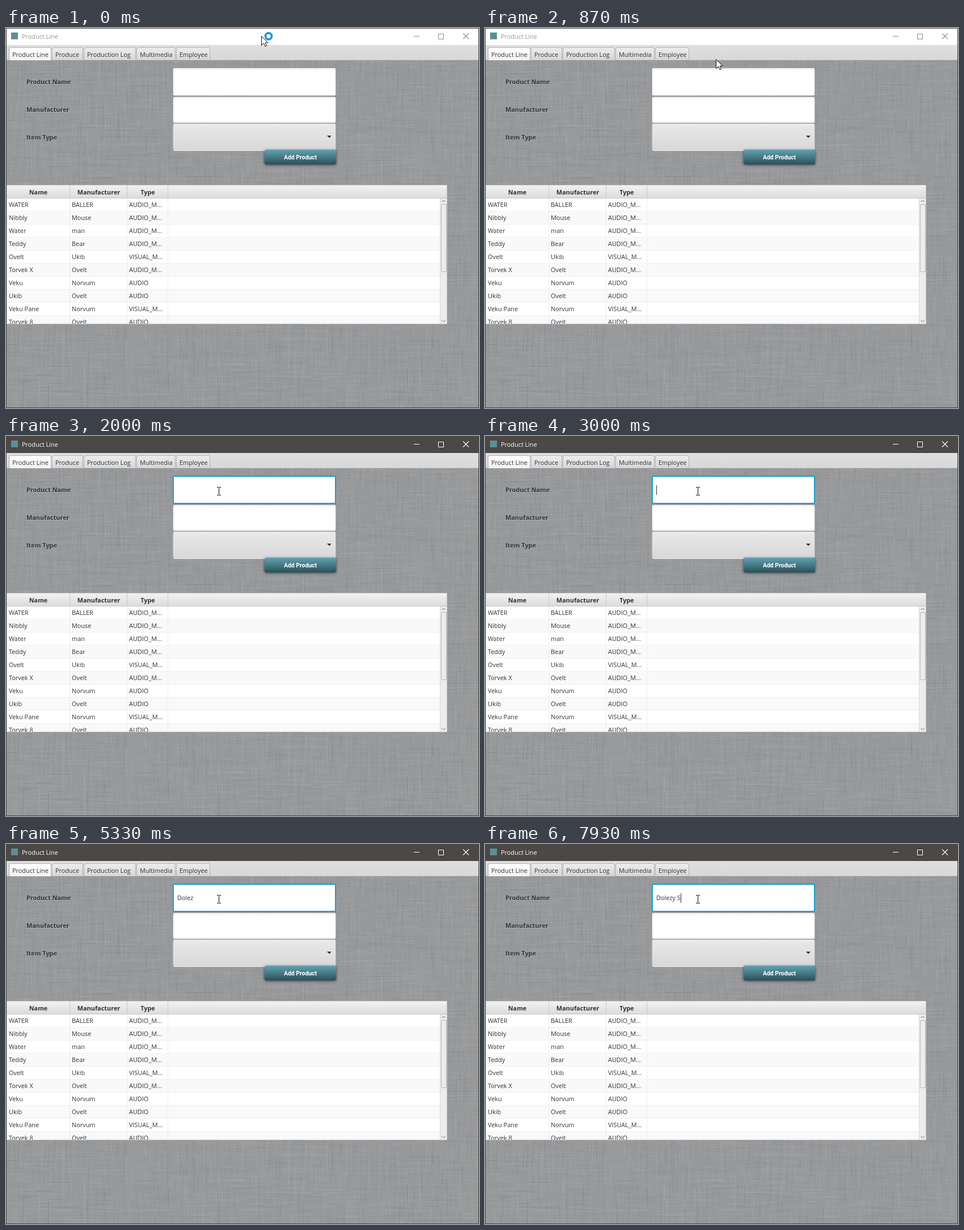
Animation, 834 px wide and 671 px high, one loop 8 s. Source, as an HTML page with a canvas:

```html
<!DOCTYPE html>
<html lang="en">
<head>
<meta charset="utf-8">
<title>Product Line</title>
<style>
  html, body { margin: 0; width: 100%; height: 100%; overflow: hidden; background: #97999b; }
  canvas { display: block; }
</style>
</head>
<body>
<canvas id="stage" width="834" height="671"></canvas>
<script>
const W = 834, H = 671, LOOP = 8000, STEP = 1000 / 15;
const UI = '10.9px "Open Sans", sans-serif';
const UI_BOLD = 'bold 10.9px "Open Sans", sans-serif';
const BUTTON_FONT = 'bold 10.4px Roboto, sans-serif';
const INK = '#333';

const ctx = document.getElementById('stage').getContext('2d');

const TABS = [
  ['Product Line', 6, 80], ['Produce', 82, 136], ['Production Log', 138, 229],
  ['Multimedia', 231, 299], ['Employee', 301, 360]
];
const COLUMNS = [['Name', 1, 112], ['Manufacturer', 113, 213], ['Type', 214, 285]];
const ROWS = [
  ['WATER', 'BALLER', 'AUDIO_M...'],
  ['Nibbly', 'Mouse', 'AUDIO_M...'],
  ['Water', 'man', 'AUDIO_M...'],
  ['Teddy', 'Bear', 'AUDIO_M...'],
  ['Ovelt', 'Ukib', 'VISUAL_M...'],
  ['Torvek X', 'Ovelt', 'AUDIO_M...'],
  ['Veku', 'Norvum', 'AUDIO'],
  ['Ukib', 'Ovelt', 'AUDIO'],
  ['Veku Pane', 'Norvum', 'VISUAL_M...'],
  ['Torvek 8', 'Ovelt', 'AUDIO']
];

// time, typed characters, caret visible
const PRODUCT = 'Dolezy S';
const TYPING = [
  [2000, 0, 0], [2070, 0, 1], [2530, 0, 0], [3000, 0, 1], [3530, 1, 1],
  [3800, 2, 1], [4130, 3, 1], [4330, 4, 1], [4800, 5, 1], [5330, 5, 0],
  [5870, 5, 1], [6330, 5, 0], [6400, 6, 1], [6870, 6, 0], [7070, 7, 1],
  [7600, 7, 0], [7930, 8, 1]
];

// time, x, y of the pointer
const POINTER = [
  [133, 450, 14], [200, 449, 12], [267, 446, 10], [467, 428, 25],
  [1000, 400, 65], [1533, 375, 97]
];

function box(c, x, y, w, h, fill) {
  c.fillStyle = fill;
  c.fillRect(x, y, w, h);
}

function frame(c, x, y, w, h, stroke) {
  c.strokeStyle = stroke;
  c.lineWidth = 1;
  c.strokeRect(x + 0.5, y + 0.5, w - 1, h - 1);
}

function round(c, x, y, w, h, r, fill) {
  c.beginPath();
  c.roundRect(x, y, w, h, r);
  c.fillStyle = fill;
  c.fill();
}

function line(c, points, stroke, width = 1) {
  c.beginPath();
  points.forEach(([x, y]) => c.lineTo(x, y));
  c.strokeStyle = stroke;
  c.lineWidth = width;
  c.stroke();
}

function text(c, str, x, y, font = UI, fill = INK, align = 'left') {
  c.font = font;
  c.fillStyle = fill;
  c.textAlign = align;
  c.fillText(str, x, y);
}

function shade(c, y1, y2, ...colors) {
  const g = c.createLinearGradient(0, y1, 0, y2);
  colors.forEach((color, i) => g.addColorStop(i / (colors.length - 1), color));
  return g;
}

function seeded(seed) {
  return () => {
    seed = (seed + 0x6d2b79f5) | 0;
    let n = Math.imul(seed ^ (seed >>> 15), 1 | seed);
    n ^= n + Math.imul(n ^ (n >>> 7), 61 | n);
    return ((n ^ (n >>> 14)) >>> 0) / 4294967296;
  };
}

// Woven threads: short strokes alternately across and down.
function drawLinen(c) {
  const rand = seeded(4127);
  c.save();
  c.beginPath();
  c.rect(0, 57, W, H - 57);
  c.clip();
  box(c, 0, 57, W, H - 57, '#97999b');
  for (let i = 0; i < 11000; i++) {
    const x = Math.floor(rand() * (W + 80)) - 80;
    const y = Math.floor(rand() * (H + 23)) - 23;
    const length = 8 + rand() * 60;
    const alpha = 0.015 + rand() * 0.05;
    const tone = rand() < 0.5 ? '255,255,255' : '45,48,52';
    box(c, x, y, i % 2 ? length : 1, i % 2 ? 1 : length, `rgba(${tone},${alpha})`);
  }
  c.restore();
}

function drawTabs(c) {
  box(c, 0, 30, W, 27, shade(c, 30, 57, '#dfdfdf', '#d8d8d8'));
  box(c, 0, 56, W, 1, '#c4c4c4');
  TABS.forEach(([label, left, right], i) => {
    const bottom = i ? 56 : 57;
    round(c, left - 1, 34, right - left + 1, bottom - 34, [4, 4, 0, 0], '#b3b3b3');
    round(c, left, 35, right - left - 1, bottom - 35, [3, 3, 0, 0],
      i ? shade(c, 35, 57, '#ececec', '#d7d7d7') : shade(c, 35, 57, '#ffffff', '#f1f1f1'));
    text(c, label, left + 5, 51);
  });
}

function drawField(c, y, h) {
  round(c, 294.5, y + 0.5, 287, h - 1, 3, '#c4c4c4');
  round(c, 295, y + 1, 286, h - 2, 2, shade(c, y, y + 6, '#eeeeee', '#ffffff'));
}

function drawForm(c) {
  [['Product Name', 99], ['Manufacturer', 148], ['Item Type', 197]].forEach(([label, y]) => {
    text(c, label, 36, y + 1, UI_BOLD, 'rgba(255,255,255,.4)');
    text(c, label, 36, y, UI_BOLD);
  });
  drawField(c, 70, 50);
  drawField(c, 121, 47);

  round(c, 294.5, 168.5, 287, 48, 3, '#c4c4c4');
  round(c, 295, 169, 286, 47, 2, shade(c, 169, 216, '#e9e9e9', '#d8d8d8'));
  box(c, 296, 216, 284, 1, '#eeeeee');
  c.beginPath();
  c.moveTo(566, 190);
  c.lineTo(574, 190);
  c.lineTo(570, 194);
  c.fillStyle = INK;
  c.fill();

  c.save();
  c.shadowColor = 'rgba(0,0,0,.6)';
  c.shadowBlur = 5;
  c.shadowOffsetY = 1;
  round(c, 456, 215, 126, 26, 3, shade(c, 215, 241, '#61a2b1', '#2a5058'));
  c.restore();
  text(c, 'Add Product', 519, 232, BUTTON_FONT, '#fff', 'center');
}

function drawScrollBar(c) {
  box(c, 765, 301, 12, 221, '#ececec');
  box(c, 765, 301, 1, 221, '#d8d8d8');
  round(c, 767, 311, 10, 120, 3, '#b8b8b8');
  round(c, 768, 312, 8, 118, 2, '#ededed');
  line(c, [[768.5, 307], [771.5, 304], [774.5, 307]], '#666');
  line(c, [[768.5, 516], [771.5, 519], [774.5, 516]], '#666');
}

function drawTable(c) {
  box(c, 1, 277, 777, 246, '#c8c8c8');
  box(c, 2, 278, 775, 22, shade(c, 278, 300, '#f2f2f2', '#dcdcdc'));
  c.save();
  c.beginPath();
  c.rect(2, 301, 775, 221);
  c.clip();
  ROWS.forEach((cells, i) => {
    const y = 301 + 23 * i;
    box(c, 2, y, 775, 23, i % 2 ? '#f9f9f9' : '#ffffff');
    box(c, 2, y + 22, 775, 1, '#f0f0f0');
    cells.forEach((cell, k) => text(c, cell, [5, 116, 217][k], y + 15));
  });
  c.restore();
  COLUMNS.forEach(([label, left, right]) => {
    text(c, label, (left + right) / 2 + 0.5, 294, UI_BOLD, INK, 'center');
    box(c, right, 278, 1, 22, '#c8c8c8');
    box(c, right, 301, 1, 221, '#ededed');
  });
  drawScrollBar(c);
}

function drawWindow() {
  const layer = document.createElement('canvas');
  layer.width = W;
  layer.height = H;
  const c = layer.getContext('2d');
  drawLinen(c);
  drawTabs(c);
  drawForm(c);
  drawTable(c);
  return layer;
}

function drawTitleBar(active) {
  const ink = active ? '#ffffff' : '#8e8e8e';
  box(ctx, 0, 0, W, 30, active ? '#4b4845' : '#ffffff');
  frame(ctx, 0, 0, W, H, active ? '#4b4845' : '#444444');
  box(ctx, 9, 8, 12, 12, '#5d8e98');
  text(ctx, 'Product Line', 28, 19, UI, active ? '#ffffff' : '#969696');
  box(ctx, 719, 14, 10, 1, ink);
  frame(ctx, 762, 10, 10, 10, ink);
  line(ctx, [[806, 9.5], [816, 19.5]], ink, 1.1);
  line(ctx, [[816, 9.5], [806, 19.5]], ink, 1.1);
}

function drawTyping(time) {
  const [, count, caret] = TYPING.findLast(([start]) => start <= time);
  ctx.beginPath();
  ctx.roundRect(295, 71, 286, 48, 2);
  ctx.strokeStyle = '#1c9cc8';
  ctx.lineWidth = 2;
  ctx.stroke();
  const typed = PRODUCT.slice(0, count);
  text(ctx, typed, 302, 99);
  if (caret) box(ctx, Math.round(302 + ctx.measureText(typed).width), 87, 1, 17, INK);
}

function pointerAt(time) {
  const t = Math.floor((time + 4) / STEP) * STEP;
  const next = POINTER.findIndex(([start]) => start > t);
  if (next < 0) return POINTER.at(-1).slice(1);
  if (next === 0) return POINTER[0].slice(1);
  const [t0, x0, y0] = POINTER[next - 1], [t1, x1, y1] = POINTER[next];
  const k = (t - t0) / (t1 - t0);
  return [Math.round(x0 + (x1 - x0) * k), Math.round(y0 + (y1 - y0) * k)];
}

function drawArrow(x, y) {
  const shape = [[0, 0], [0, 16], [4, 12.5], [6.5, 18], [9, 17], [6.5, 11.5], [11.5, 11.5]];
  ctx.beginPath();
  shape.forEach(([dx, dy]) => ctx.lineTo(x + 0.5 + dx, y + 0.5 + dy));
  ctx.closePath();
  ctx.fillStyle = '#fff';
  ctx.fill();
  ctx.strokeStyle = '#111';
  ctx.lineWidth = 1;
  ctx.stroke();
}

function drawBusyRing(x, y) {
  ctx.beginPath();
  ctx.arc(x, y, 5.6, 0, Math.PI * 2);
  ctx.fillStyle = '#e9f5fc';
  ctx.fill();
  ctx.strokeStyle = '#1f95d6';
  ctx.lineWidth = 3.6;
  ctx.stroke();
}

function drawBeam(x, y) {
  box(ctx, x, y - 6, 1, 13, '#000');
  for (const edge of [y - 7, y + 7]) {
    box(ctx, x - 3, edge, 3, 1, '#000');
    box(ctx, x + 1, edge, 3, 1, '#000');
  }
}

function drawPointer(time) {
  const [x, y] = pointerAt(time);
  if (y > 70) return drawBeam(x, y);
  drawArrow(x, y);
  if (time < 730) drawBusyRing(x + 13, y + 0.5);
}

const windowLayer = drawWindow();

function render(now) {
  const time = now % LOOP;
  const active = time >= 2000;
  ctx.drawImage(windowLayer, 0, 0);
  drawTitleBar(active);
  if (active) drawTyping(time);
  drawPointer(time);
}

const begin = performance.now();
function tick() {
  render(performance.now() - begin);
  requestAnimationFrame(tick);
}
tick();
</script>
</body>
</html>
```
